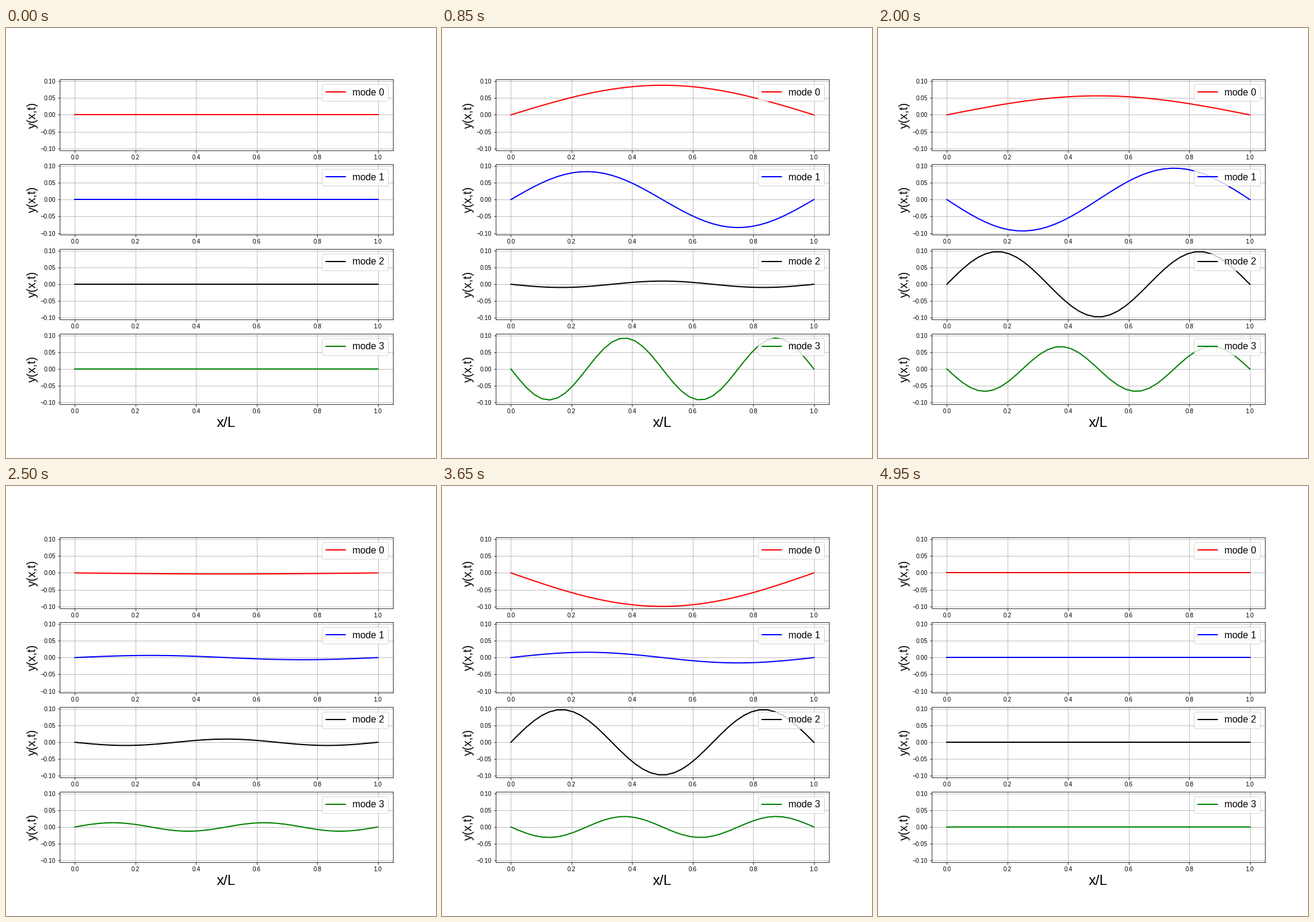
A matplotlib script for the animation above (5 s loop, 720 by 720 pixels).

```python
import numpy as np
import matplotlib.pyplot as plt
from matplotlib.animation import FuncAnimation

FRAMES = 100
INTERVAL = 50
AMPLITUDE = 0.1
COLORS = ["red", "blue", "black", "green"]

plt.rcParams["font.family"] = "Liberation Sans"
plt.rcParams["font.size"] = 10

x = np.linspace(0, 1, 40)
phase = np.linspace(0, 2 * np.pi, FRAMES)


def standing_wave(mode, frame):
    k = mode + 1
    return AMPLITUDE * np.sin(k * np.pi * x) * np.sin(k * phase[frame])


fig, axes = plt.subplots(4, 1, figsize=(10, 10), dpi=72)
fig.subplots_adjust(left=0.125, right=0.9, bottom=0.125, top=0.88,
                    hspace=0.2)

lines = []
for mode, (ax, color) in enumerate(zip(axes, COLORS)):
    line, = ax.plot(x, standing_wave(mode, 0), color=color, lw=2,
                    label=f"mode {mode}")
    lines.append(line)
    ax.set_xlim(-0.05, 1.05)
    ax.set_ylim(-0.105, 0.105)
    ax.set_yticks(np.linspace(-0.1, 0.1, 5))
    ax.set_ylabel("y(x,t)", fontsize=20)
    ax.grid(True)
    ax.legend(loc="upper right", fontsize=16)
axes[-1].set_xlabel("x/L", fontsize=24)


def update(frame):
    for mode, line in enumerate(lines):
        line.set_ydata(standing_wave(mode, frame))
    return lines


anim = FuncAnimation(fig, update, frames=FRAMES, interval=INTERVAL,
                     repeat=True, repeat_delay=0)
plt.show()
```
